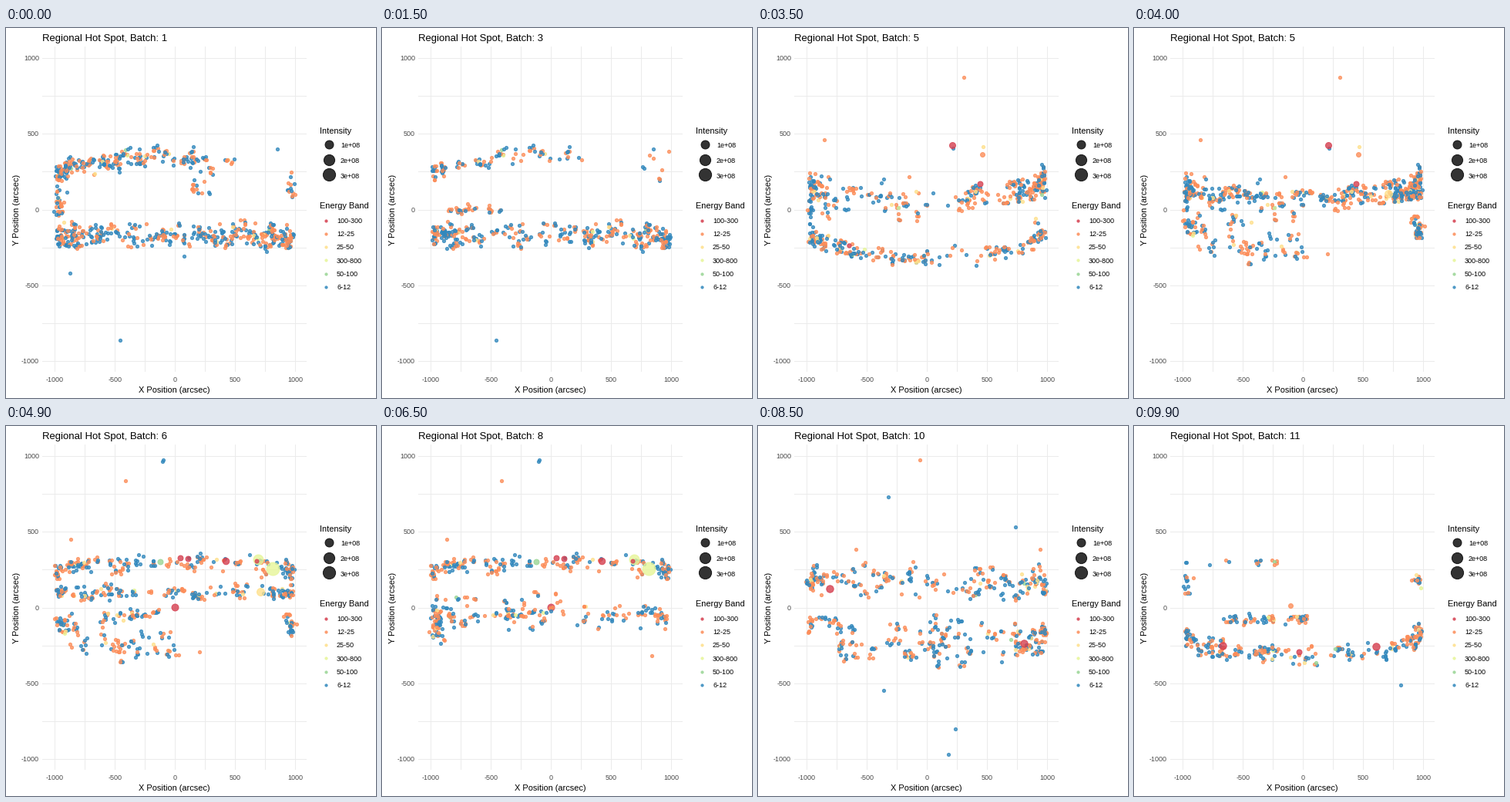
Write a matplotlib script that moves like this. It is 480 px wide and 480 px high and loops after 10 s.

```python
import numpy as np
import matplotlib.pyplot as plt
from matplotlib.animation import FuncAnimation
from matplotlib.colors import to_rgba_array
from matplotlib.patches import Rectangle

plt.rcParams["font.family"] = ["Liberation Sans", "DejaVu Sans"]

SIZE, DPI = 480, 72
RED, ORANGE, YELLOW = "#D53E4F", "#FC8D59", "#FEE08B"
LIME, GREEN, BLUE = "#E6F598", "#99D594", "#3288BD"
GRID, TICK = "#EBEBEB", "#4D4D4D"
ALPHA = 0.8
DISC = 975      # radius of the solar disc in arcsec
DOT = 2.6       # radius of an ordinary point in pixels

rng = np.random.default_rng(7)

fig = plt.figure(figsize=(SIZE / DPI, SIZE / DPI), dpi=DPI, facecolor="white")
ax = fig.add_axes([0, 0, 1, 1])
ax.set(xlim=(0, SIZE), ylim=(SIZE, 0))
ax.axis("off")


def px(x):
    return 219.5 + 0.156 * np.asarray(x)


def py(y):
    return 236 - 0.1967 * np.asarray(y)


def label(x, y, text, size, color="black", **kw):
    return ax.text(x, y, text, fontsize=size, color=color, **kw)


def dots(x, y, radius, colors):
    """Translucent discs; the outline overlaps the fill and so looks darker."""
    rgba = to_rgba_array(colors, ALPHA)
    inner = np.asarray(radius) - 0.5
    return ax.scatter(x, y, s=(2 * inner) ** 2, facecolors=rgba,
                      edgecolors=rgba, linewidths=1, zorder=3, snap=False)


def belt(n, limb, bow=0, spread=35, west=-1, east=1):
    """Active regions along one latitude of a tilted sphere.

    limb is the height at the edge of the disc, bow the extra height at its
    middle; west and east bound the belt as fractions of the radius.
    """
    m = n // 2 + 1
    lon = rng.uniform(np.arcsin(west), np.arcsin(east), m)
    x = DISC * np.sin(lon)
    y = limb + bow * np.cos(lon) + np.clip(rng.normal(0, spread, m), -2 * spread, 2 * spread)
    pick = rng.integers(0, m, n)
    x = x[pick] + rng.normal(0, 13, n)
    y = y[pick] + rng.normal(0, 13, n)
    colors = rng.choice([BLUE, ORANGE, YELLOW, GREEN, LIME], n,
                        p=[0.475, 0.475, 0.035, 0.01, 0.005])
    return [(a, b, c, DOT) for a, b, c in zip(x, y, colors)]


def spot(x, y, color=BLUE, radius=DOT):
    return [(x, y, color, radius)]


def group(*parts):
    x, y, colors, radius = zip(*sum(parts, []))
    return dots(np.floor(px(x)) + 0.5, np.floor(py(y)) + 0.5, radius, colors)


def draw_axes():
    for v in range(-1000, 1001, 250):
        for corner, w, h in [((np.floor(px(v)), 24), 1, 422),
                             ((47, np.floor(py(v))), 343, 1)]:
            ax.add_patch(Rectangle(corner, w, h, color=GRID, lw=0, zorder=1))
    for v in range(-1000, 1001, 500):
        label(px(v), 459, f"{v}", 9, TICK, ha="center")
        label(43, py(v) + 2.7, f"{v}", 9, TICK, ha="right")
    label(218, 473, "X Position (arcsec)", 11, ha="center")
    label(17, 235.5, "Y Position (arcsec)", 11, ha="center",
          rotation=90, rotation_mode="anchor")


def draw_legend():
    label(407, 137, "Intensity", 11)
    for k, r in enumerate([6, 7.6, 8.6]):
        y = 150.7 + 19.8 * k
        dots([418.5], [y], [r], ["black"])
        label(434, y + 4.3, f"{k + 1}e+08", 9)
    label(407, 234, "Energy Band", 11)
    keys = {"100-300": RED, "12-25": ORANGE, "25-50": YELLOW,
            "300-800": LIME, "50-100": GREEN, "6-12": BLUE}
    for k, (name, color) in enumerate(keys.items()):
        y = 249.5 + 17.28 * k
        dots([415], [y], [2.1], [color])
        label(429, y + 3.2, name, 9)


draw_axes()
draw_legend()
title = label(47, 17, "", 13.1)

groups = [
    group(belt(140, 220, 120, 28, east=0.5), belt(230, -170),
          belt(34, 60, spread=60, east=-0.93), belt(18, 170, 0, 60, 0.05, 0.35),
          belt(14, 150, 0, 70, 0.93), spot(-875, -420), spot(80, -310)),
    group(belt(95, 240, 110, 28, east=0.25), belt(190, -180, 20, 38),
          spot(-455, -860), spot(155, 415), spot(850, 400)),
    group(belt(35, 0, 0, 10, -0.9, -0.4), belt(160, -190, 40, 42),
          belt(10, 220, 0, 80, 0.7)),
    group(belt(230, -130, -180, 28), belt(24, 40, spread=80, east=-0.8),
          spot(-650, -235, RED, 3.2)),
    group(belt(130, 130, -60, 70, east=0), belt(190, 190, -110, 50, 0.02),
          belt(14, -100, 0, 60, 0.93), spot(305, 872, ORANGE),
          spot(-855, 460, ORANGE), spot(470, 415, YELLOW), spot(220, 405),
          spot(211, 422, RED, 4.5), spot(460, 364, ORANGE, 3.5),
          spot(445, 172, RED, 4)),
    group(belt(190, 105, spread=22), belt(60, -120, -60, 60, -0.95, 0),
          belt(45, -280, 0, 35, -0.8, 0.4), belt(30, -130, 0, 45, 0.94),
          belt(22, -110, spread=30, east=-0.9), spot(711, 105, YELLOW, 5.5)),
    group(belt(200, 230, 75, 30), belt(34, -40, 0, 12, -0.5, 0),
          spot(-410, 835, ORANGE), spot(-105, 965), spot(-95, 972),
          spot(-867, 452, ORANGE), spot(-122, 300, GREEN, 4),
          spot(48, 328, RED, 4), spot(112, 325, RED, 4),
          spot(426, 308, RED, 4.8), spot(695, 318, LIME, 7),
          spot(682, 308, RED, 3), spot(817, 258, LIME, 9), spot(0, 5, RED, 5)),
    group(belt(150, -60), belt(30, -150, spread=40, east=-0.9),
          belt(35, 50, 0, 50, -1, 0.3), spot(840, -320, ORANGE)),
    group(belt(140, 170, 20, 45), belt(120, -130), spot(-808, 125, RED, 5.2)),
    group(belt(120, 170, 0, 50), belt(170, -215, -70, 45, -0.75),
          spot(-55, 975, ORANGE), spot(-320, 730), spot(735, 530),
          spot(235, -800), spot(180, -970), spot(-360, -545),
          spot(-590, 385, ORANGE), spot(940, 385, ORANGE),
          spot(806, -236, RED, 5.2)),
    group(belt(160, -180, -130, 28), belt(16, 290, 0, 14, -1, -0.2),
          belt(14, 170, spread=40, east=-0.93), spot(815, -512),
          spot(-667, -250, RED, 5.2)),
    group(belt(75, -80, 0, 12, -0.66, 0.1), belt(100, -160, -140, 32),
          belt(14, 195, 0, 16, 0.9), spot(-103, 15, ORANGE, 3.5),
          spot(608, -258, RED, 5.2), spot(-30, -290, RED, 4)),
]


def update(frame):
    # Each window shows two neighbouring groups; the title runs half a step ahead.
    first = (frame + (frame >= 49)) // 10
    for k, points in enumerate(groups):
        points.set_visible(first <= k <= first + 1)
    title.set_text(f"Regional Hot Spot, Batch: {(frame + 5) // 10 + 1}")
    return [*groups, title]


anim = FuncAnimation(fig, update, frames=100, interval=100, repeat=True,
                     repeat_delay=0, blit=False)
plt.show()
```
